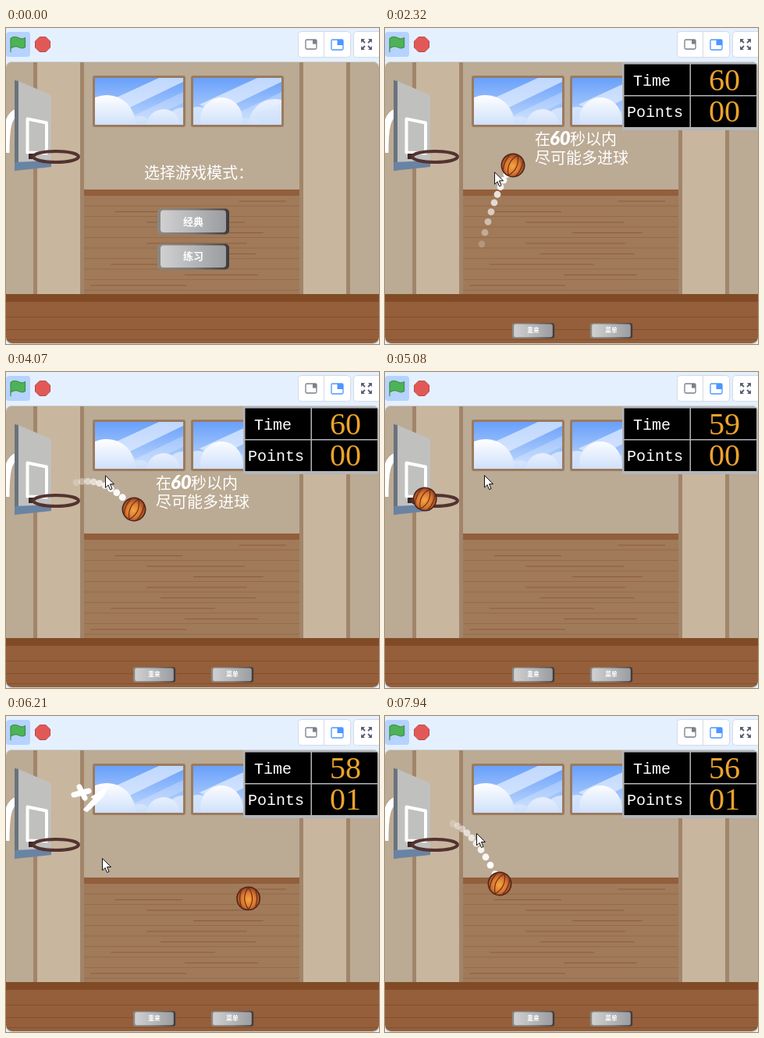
Recreate the animation shown at these times as an HTML page. Size 478 px wide and 405 px high, loop 8000 ms.

```html
<!DOCTYPE html>
<html lang="zh">
<head>
<meta charset="utf-8">
<title>Basketball game</title>
<style>
  html, body { margin: 0; width: 100%; height: 100%; overflow: hidden; background: #e5f0ff; }
  svg { display: block; width: 478px; height: 405px; }
  .cjk { font-family: "Noto Sans CJK SC", "Noto Sans CJK", sans-serif; font-size: 20px; font-weight: 300; fill: #fff; }
  .cap { font-size: 13px; font-weight: 700; text-anchor: middle; }
  .label { font: 20px "Liberation Mono", monospace; fill: #fff; }
  .digits { font: 40px "Liberation Serif", serif; fill: #eda32d; }
  .marker { font: italic 900 24px Lato, sans-serif; }
</style>
</head>
<body>
<svg viewBox="0 0 478 405">
  <defs>
    <linearGradient id="sky" x2="0" y2="1"><stop stop-color="#69a0fb"/><stop offset="1" stop-color="#c3dafb"/></linearGradient>
    <linearGradient id="cloud" gradientUnits="userSpaceOnUse" x1="0" y1="22" x2="0" y2="60"><stop stop-color="#fff"/><stop offset="1" stop-color="#cfe0fb"/></linearGradient>
    <linearGradient id="metal"><stop stop-color="#d0d0d1"/><stop offset="1" stop-color="#9b9da0"/></linearGradient>
    <linearGradient id="edge"><stop stop-color="#8c8782"/><stop offset=".5" stop-color="#77787b"/><stop offset="1" stop-color="#3d3a3c"/></linearGradient>
    <radialGradient id="leather" cx=".5" cy=".55" r=".55"><stop stop-color="#f5a540"/><stop offset=".55" stop-color="#dc7a30"/><stop offset="1" stop-color="#8e3d22"/></radialGradient>
    <clipPath id="stage"><rect y="43" width="478" height="361" rx="8"/></clipPath>
    <clipPath id="pane"><rect width="113" height="60"/></clipPath>
    <g id="button">
      <rect x="-46" y="-16.5" width="92" height="33" rx="5" fill="url(#edge)"/>
      <rect x="-42" y="-14.5" width="84" height="28.5" rx="4" fill="url(#metal)"/>
    </g>
    <g id="glass">
      <rect x="-3" y="-3" width="119" height="66" rx="3" fill="#9b7b5f"/>
      <rect width="113" height="60" fill="url(#sky)"/>
      <g fill="#e6f0ff" clip-path="url(#pane)">
        <path d="M82 0h31v5L30 45 8 34z" opacity=".7"/>
        <path d="M113 18v14L60 56 42 52z" opacity=".3"/>
      </g>
    </g>
  </defs>

  <g id="toolbar">
    <rect y="5" width="31" height="32" rx="4" fill="#b5d3fd"/>
    <path d="M6 30.500V13.500C10 10 14 11.500 17 13S22 14 24.500 12.500V24.500C22 26.500 19 26 16 24.500S10 23.500 6 26" fill="#4cb457" stroke="#459049" stroke-width="1.300" stroke-linejoin="round" stroke-linecap="round"/>
    <path d="M43 11.500h8l5.500 5.500v8l-5.500 5.500h-8l-5.500-5.500v-8z" fill="#e25857" stroke="#b84a4a"/>
    <g fill="#fff" stroke="#d3dae5">
      <rect x="374.500" y="4.500" width="67" height="33" rx="4"/>
      <rect x="445.500" y="4.500" width="40" height="33" rx="4"/>
      <path d="M407.500 5v32"/>
    </g>
    <rect x="384" y="15" width="14" height="12" rx="1.500" fill="none" stroke="#7a7f8b" stroke-width="1.300"/>
    <rect x="393" y="15" width="5" height="5.500" fill="#7a7f8b"/>
    <rect x="417" y="15" width="15" height="13" rx="1.500" fill="none" stroke="#4c97ff" stroke-width="1.300"/>
    <rect x="424.500" y="15" width="7.500" height="7" fill="#4c97ff"/>
    <g fill="#575e75" stroke="#575e75" stroke-width="1.800">
      <path d="M456 15l4 4M468 15l-4 4M456 27l4-4M468 27l-4-4"/>
      <path d="M455 14h5l-5 5zM469 14h-5l5 5zM455 28h5l-5-5zM469 28h-5l5-5z" stroke="none"/>
    </g>
  </g>

  <g clip-path="url(#stage)">
    <rect y="43" width="478" height="362" fill="#bbaa94"/>
    <path d="M35 43h65v298h-65zM376 43h65v298h-65z" fill="#a1856b"/>
    <path d="M40 43h55v298h-55zM381 43h55v298h-55z" fill="#c8b69e"/>
    <rect x="100" y="207" width="276" height="134" fill="#a07a59"/>
    <rect x="100" y="207" width="276" height="8" fill="#925f3d"/>
    <g id="grain" stroke="#8a5538"></g>
    <rect y="341" width="478" height="64" fill="#945f3a"/>
    <rect y="341" width="478" height="10" fill="#804b26"/>
    <path d="M0 370.500h478M0 386.500h478M0 399.500h478" stroke="#84502e"/>

    <g transform="translate(114 64)">
      <use href="#glass"/>
      <g clip-path="url(#pane)" fill="url(#cloud)">
        <circle cx="112" cy="58" r="20" opacity=".7"/><circle cx="58" cy="64" r="15" opacity=".7"/>
        <circle cx="88" cy="62" r="22"/><circle cx="15" cy="59" r="37"/>
      </g>
    </g>
    <g transform="translate(240 64)">
      <use href="#glass"/>
      <g clip-path="url(#pane)" fill="url(#cloud)">
        <circle cx="6" cy="55" r="18" opacity=".7"/><circle cx="71" cy="76" r="25" opacity=".7"/>
        <circle cx="104" cy="60" r="33" opacity=".8"/><circle cx="36" cy="52" r="27"/>
      </g>
    </g>

    <path d="M0 160C0 130 2 113 14 108" fill="none" stroke="#fff" stroke-width="9"/>
    <path d="M11 67l5 1v114l-5 1z" fill="#69737d"/>
    <path d="M16 68l42 18v91l-42 5z" fill="#c0c0bf"/>
    <path d="M11 172l47-2v8l-47 5z" fill="#6983a3"/>
    <path d="M27.500 116.500l24.500 5v39l-24.500-1z" fill="none" stroke="#fff" stroke-width="4" stroke-linejoin="round"/>
    <rect x="29" y="161" width="7" height="7" fill="#3e2926"/>
    <ellipse cx="64" cy="165" rx="29" ry="7" fill="none" stroke="#533330" stroke-width="4"/>

    <g id="menu">
      <text class="cjk" x="177" y="193">选择游戏模式：</text>
      <g id="classic"><use href="#button"/><text class="cjk cap" y="5">经典</text></g>
      <g id="practice"><use href="#button"/><text class="cjk cap" y="4">练习</text></g>
    </g>

    <g id="game">
      <g transform="translate(190 388) scale(.59)"><use href="#button"/><text class="cjk cap" y="4">重来</text></g>
      <g transform="translate(290 388) scale(.59)"><use href="#button"/><text class="cjk cap" y="4">菜单</text></g>
      <rect x="304" y="43" width="174" height="88" fill="#b3b6ba"/>
      <path d="M306.500 46.500h84v39.500h-84zM392 46.500h84v39.500h-84zM306.500 87.500h84v39.500h-84zM392 87.500h84v39.500h-84z"/>
      <text class="label" x="318" y="74">Time</text>
      <text class="label" x="310" y="114">Points</text>
      <text class="digits" id="time" x="415" y="79.500"></text>
      <text class="digits" id="points" x="415" y="119.500"></text>
      <g id="hint" class="cjk">
        <text x="192" y="150">在</text>
        <text class="marker" x="211" y="150">60</text>
        <text x="237" y="150">秒以内</text>
        <text x="192" y="174">尽可能多进球</text>
      </g>
      <g id="dots" fill="#fff"></g>
      <g id="bonus" fill="#fff" stroke="#fff" stroke-linecap="round" stroke-linejoin="round">
        <path d="M-21-3L-2-8M-14-13L-7 1" stroke-width="7"/>
        <path d="M2 0L22-13 16-1-4 18-8 16 5 2z" stroke-width="2"/>
      </g>
      <g id="ball">
        <circle r="14.700" fill="url(#leather)" stroke="#4c2419" stroke-width="1.500"/>
        <path d="M0-14Q-10 0 0 14M0-14Q10 0 0 14M-9-11Q-13 0-9 11M9-11Q13 0 9 11" fill="none" stroke="#6b2f18" stroke-width="1.200"/>
      </g>
    </g>
  </g>
  <rect x="-.5" y="43.500" width="479" height="361" rx="8" fill="none" stroke="#c9cdd3"/>
  <circle id="click" cx="230" cy="249" r="11.500" fill="#e6e02c"/>
  <path id="cursor" d="M.5.5V16L4 12.500 6.500 18.500 9 17.500 6.500 11.500H11.500Z" fill="#fff" stroke="#111"/>
</svg>

<script>
const LOOP = 8000, STEP = 79.1;
const GRAVITY = 853, FLOOR = 358, BOARD = 49, WALL = 463;
const LAUNCH = 4580, RESPAWN = 7910;
const $ = id => document.getElementById(id);
const clamp = v => Math.max(0, Math.min(1, v));
const easeOut = k => k * (2 - k);
const show = (id, on) => $(id).style.display = on ? '' : 'none';
const place = (id, x, y, extra = '') => $(id).setAttribute('transform', `translate(${x} ${y}) ${extra}`);

// Pointer stops: step, x, y
const stops = [
  [1, 314, 374], [2, 280, 359], [5, 280, 359], [10, 238, 266], [12, 238, 264], [16, 230, 249],
  [25, 230, 250], [28, 144, 200], [36, 127, 133], [68, 127, 132], [78, 123, 182], [99, 117, 150]
];

function pointerAt(step) {
  const i = stops.findIndex(s => s[0] > step);
  const b = stops.at(i), a = i > 0 ? stops[i - 1] : b;
  const k = a === b ? 0 : easeOut((step - a[0]) / (b[0] - a[0]));
  return [1, 2].map(n => a[n] + (b[n] - a[n]) * k);
}

// Throw against the board, then bounce off the floor and the right wall
function ballAt(time) {
  if (time >= RESPAWN) return [147, 215];
  let x = 164, y = 176, vx = -235, vy = -241;
  const dt = .004;
  for (let t = LAUNCH; t < time; t += dt * 1000) {
    x += vx * dt;
    y += vy * dt + GRAVITY / 2 * dt * dt;
    vy += GRAVITY * dt;
    if (x < BOARD) vx = Math.abs(vx);
    if (x > WALL) vx = -.7 * Math.abs(vx);
    if (y > FLOOR && vy > 0) vy *= -.765;
  }
  return [x, y];
}

function add(parent, tag, attrs) {
  const el = document.createElementNS('http://www.w3.org/2000/svg', tag);
  for (const key in attrs) el.setAttribute(key, attrs[key]);
  return $(parent).appendChild(el);
}

// Wood grain: long seams with a random short streak between them
let seed = 7;
const random = () => (seed = seed * 16807 % 2147483647) / 2147483647;
for (let y = 228; y < 341; y += 13.5) {
  add('grain', 'path', { d: `M100 ${y}h276`, opacity: .4 });
  const w = 60 + 90 * random(), x = 100 + (276 - w) * random();
  add('grain', 'path', { d: `M${x} ${y - 6}h${w}`, opacity: .8 });
}

const dots = Array.from({ length: 10 }, (_, i) =>
  add('dots', 'circle', { r: 4.4, opacity: 1 - .0078 * (i + 1) ** 2 }));

function draw(t) {
  const step = Math.max(0, Math.floor((t - 5) / STEP));
  const time = step * STEP + 18;
  const playing = step >= 21;

  show('menu', !playing);
  show('game', playing);
  place('classic', 240, 248, `scale(${1 + .1 * clamp((step - 12) / 3)})`);
  place('practice', 240, 293, `scale(${1 + .1 * clamp(1 - Math.abs(step - 8) / 2)})`);

  show('click', step >= 19 && step < 22);
  $('click').setAttribute('opacity', .75 - .2 * (step - 19));
  show('cursor', step >= 1);
  place('cursor', ...pointerAt(step));

  $('time').textContent = 60 - Math.max(0, Math.floor((time - 3620) / 1000));
  $('points').textContent = step >= 67 ? '01' : '00';
  show('hint', step < 56);

  const [x, y] = ballAt(time);
  const spin = time < RESPAWN ? Math.max(0, time - 5080) * .302 : 0;
  place('ball', x, y, `rotate(${25 + spin})`);

  // The preview reads the pointer one step late
  show('dots', step >= 26 && step < 56 || time >= RESPAWN);
  const [mx, my] = pointerAt(step - 1);
  dots.forEach((dot, i) => {
    const n = i + 1;
    dot.setAttribute('cx', x + (mx - x) * .2 * n);
    dot.setAttribute('cy', y + (my - y) * .2 * n + .53 * n * n);
  });

  const pop = clamp((step - 67) / 11);
  show('bonus', step >= 68 && step < 82);
  place('bonus', 108, 128 - 24 * pop, `rotate(${-30 * (1 - pop)}) scale(${.5 + .5 * pop})`);
}

function tick() {
  draw(performance.now() % LOOP);
  requestAnimationFrame(tick);
}
tick();
</script>
</body>
</html>
```
